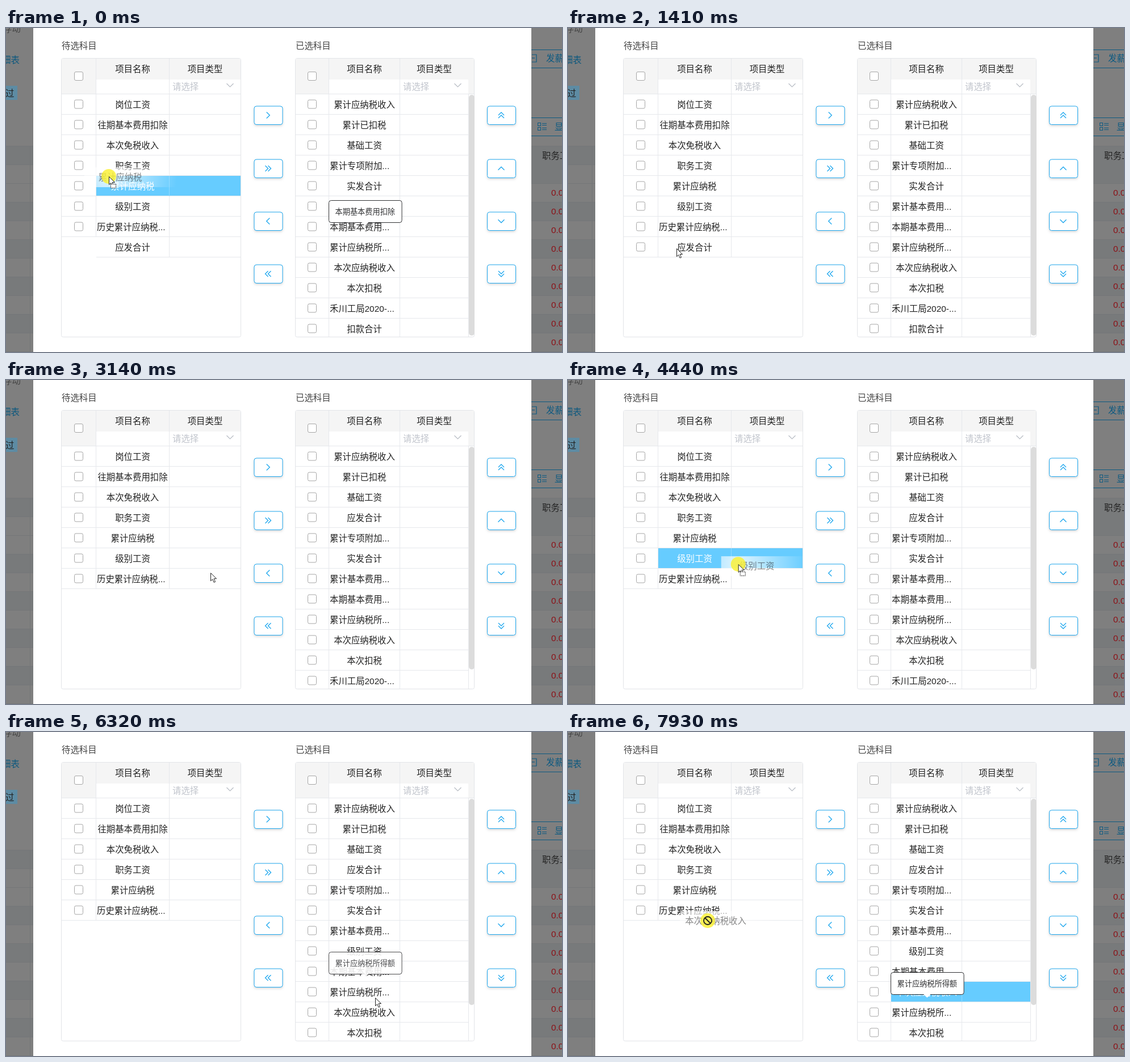
Write an HTML page with a canvas that moves like this. It is 979 px wide and 572 px high and loops after 8 s.

```html
<!DOCTYPE html>
<html lang="zh-CN">
<head>
<meta charset="utf-8">
<title>科目选择</title>
<style>
html, body { margin: 0; width: 100%; height: 100%; overflow: hidden; background: #7f7f7f; }
canvas { display: block; }
</style>
</head>
<body>
<canvas id="stage" width="979" height="572"></canvas>
<script>
const c = document.getElementById('stage').getContext('2d');
const LOOP = 8000, TOP = 117, ROW = 36, SHIFT = 120;
const BLUE = '#1ea7ee', PICK = '#66ccff', LINE = '#e6e8ec';

const names = {
  a: '岗位工资', b: '往期基本费用扣除', c: '本次免税收入', d: '职务工资',
  e: '累计应纳税', f: '级别工资', g: '历史累计应纳税...', h: '应发合计',
  A: '累计应纳税收入', B: '累计已扣税', C: '基础工资', D: '累计专项附加...',
  E: '实发合计', F: '累计基本费用...', G: '本期基本费用...', H: '累计应纳税所...',
  I: '本次应纳税收入', J: '本次扣税', K: '禾川工局2020-...', L: '扣款合计'
};

// Row order of both tables from a given time, with the scroll thumb's end
const orders = [
  [-999, 'abcdefgh', 'ABCDEFGHIJKL', 543],
  [1960, 'abcdefg', 'ABCDhEFGHIJKL', 511],
  [2040, 'abcdefg', 'ABChDEFGHIJKL', 511],
  [4700, 'abcdeg', 'ABChDEFfGHIJKL', 482],
  [7367, 'abcdeg', 'ABChDEFfGIHJKL', 482]
];

// row, start, release, end of highlight, ghost offset x, y
const drags = [
  ['e', -1, 70, 500, 20, 1],
  ['h', 1600, 2640, 3090, 49, 0],
  ['f', 4290, 4960, 5440, 33, 3],
  ['I', 7330, 8001, 8001, 14, 0]
];

// text, x, y, shown from, shown until
const tips = [
  ['本期基本费用扣除', 568, 304, -999, 500],
  ['历史累计应纳税收入', 153, 244, 4780, 5520],
  ['累计应纳税所得额', 568, 388, 6190, 6800],
  ['累计应纳税所得额', 568, 424, 7600, 9000]
];

// time, x, y of the pointer
const path = [
  [0, 181, 262], [70, 181, 262], [790, 188, 320], [880, 188, 320], [1410, 191, 389],
  [1570, 191, 389], [1720, 245, 370], [2110, 632, 234], [2270, 633, 233], [2640, 633, 233],
  [3420, 208, 400], [3500, 208, 400], [3810, 210, 314], [3950, 210, 314], [3960, 214, 316],
  [4230, 214, 316], [4440, 299, 325], [4960, 664, 402], [5370, 664, 402], [6150, 650, 469],
  [6620, 650, 469], [6850, 642, 499], [7250, 642, 499], [7330, 480, 447], [7380, 352, 405],
  [7930, 246, 333], [8000, 246, 333]
];

const within = (t, a, b) => t >= a && t < b;
const clamp = v => Math.max(0, Math.min(1, v));
const mix = (a, b, k) => a + (b - a) * k;

function pointer(t) {
  const i = path.findIndex(p => p[0] > t), p = path[i - 1], q = path[i];
  const k = (t - p[0]) / (q[0] - p[0]);
  return [mix(p[1], q[1], k), mix(p[2], q[2], k)];
}

function box(x, y, w, h, color) {
  c.fillStyle = color;
  c.fillRect(x, y, w, h);
}

function round(x, y, w, h, r, fill, stroke) {
  c.beginPath();
  c.roundRect(x, y, w, h, r);
  if (fill) { c.fillStyle = fill; c.fill(); }
  if (stroke) { c.strokeStyle = stroke; c.lineWidth = 1; c.stroke(); }
}

function poly(points, stroke, width = 1.2, fill, close) {
  c.beginPath();
  points.forEach(([x, y]) => c.lineTo(x, y));
  if (close) c.closePath();
  if (fill) { c.fillStyle = fill; c.fill(); }
  if (stroke) { c.strokeStyle = stroke; c.lineWidth = width; c.stroke(); }
}

// y is the middle of the glyphs
function text(s, x, y, color = '#222', align = 'left', size = 15.4) {
  c.font = size + 'px "Liberation Sans", "Noto Sans CJK SC", "Noto Sans CJK", sans-serif';
  c.textAlign = align;
  c.fillStyle = color;
  c.fillText(s, x, y + size * .38);
}

function check(x, y) { round(x - 7.5, y - 7.5, 15, 15, 2.5, '#fff', '#a6a6a6'); }

function backdrop() {
  box(0, 0, 979, 572, '#7f7f7f');
  box(0, 208, 979, 33, '#787a7b');
  box(925, 241, 54, 33, '#787a7b');
  for (let y = 274, i = 0; y < 572; y += 33, i++) {
    if (i % 2) box(0, y, 979, 33, '#787a7b');
    box(0, y, 979, 1, '#747678');
    text('0.0', 960, y + 16, '#8c1218');
  }
  box(0, 208, 979, 1, '#747678');
  box(0, 241, 48, 1, '#747678');
  box(42, 208, 1, 364, '#747678');
  text('浮动', -5, 1, '#444');
  text('细表', -7, 56, '#0c587e');
  box(0, 102, 20, 25, '#5d8ba3');
  text('过', -1, 115, '#222');
  const blue = '#0c5a82';
  [38, 70, 158, 190].forEach(y => box(925, y, 54, 1, blue));
  poly([[926, 47], [934, 47], [934, 60], [926, 60]], blue);
  poly([[926, 53], [931, 53]], blue);
  text('发薪', 951, 53, blue);
  for (const y of [167, 175]) {
    c.strokeStyle = blue;
    c.lineWidth = 1;
    c.strokeRect(936.5, y + .5, 5, 5);
    box(944, y + 1, 8, 1, blue);
    box(944, y + 4, 8, 1, blue);
  }
  text('显', 966, 174, blue);
  text('职务工', 944, 225, '#222');
}

const rightList = { x: 509, end: 825, name: 569, type: 693, close: 814 };
const leftList = { x: 97, end: 414, name: 159, type: 287, close: 413 };

function head(p, title) {
  text(title, p.x + 1, 31, '#444');
  round(p.x + .5, 53.5, p.end - p.x - 1, 492, 3, '#fff', '#e2e4e8');
  box(p.x + 1, 54, p.end - p.x - 2, 37, '#f5f5f5');
  box(p.x + 1, 91, p.name - p.x - 2, 26, '#f5f5f5');
  if (p.close < p.end - 5) box(p.close, 91, p.end - p.close - 1, 26, '#f5f5f5');
  box(p.x + 1, 117 - 1, p.end - p.x - 2, 1, LINE);
  [p.name - 1, p.type].forEach(x => box(x, 54, 1, 63, LINE));
  check(p.x + (p === leftList ? 31 : 30), 85);
  text('项目名称', (p.name + p.type) / 2, 72, '#222', 'center');
  text('项目类型', (p.type + p.close) / 2 + .5, 72, '#222', 'center');
  text('请选择', p.type + 6, 103, '#c0c4cc');
  const x = p.close - 18.5;
  poly([[x - 6, 98], [x, 104], [x + 6, 98]], '#b8bcc4');
}

function row(p, y, key, picked) {
  const w = p.close - p.name;
  box(p.name, y, w, 35, picked ? PICK : '#fff');
  box(p.name, y + 35, w, 1, LINE);
  box(p.type, y, 1, 36, picked ? '#8fd9ff' : LINE);
  const s = names[key], color = picked ? '#fff' : '#222';
  if (s.endsWith('...')) text(s, p.name + 1, y + 18, color);
  else text(s, (p.name + p.type) / 2, y + 18, color, 'center');
}

function list(p, side, t, boxes, picked) {
  const i = orders.findLastIndex(o => o[0] <= t);
  const now = orders[i][side], old = orders[Math.max(0, i - 1)][side];
  const k = clamp((t - orders[i][0]) / SHIFT);
  const place = key => {
    const a = old.indexOf(key), b = now.indexOf(key);
    return TOP + ROW * (a < 0 ? b : mix(a, b, k));
  };
  c.save();
  c.beginPath();
  c.rect(p.x, TOP, p.end - p.x, 428);
  c.clip();
  for (let n = 0; n < boxes; n++) {
    check(p.x + (p === leftList ? 31 : 30), TOP + 17.5 + ROW * n);
    box(p.x + 1, TOP + 35 + ROW * n, p.name - p.x - 1, 1, LINE);
  }
  box(p.name - 1, TOP, 1, ROW * boxes, LINE);
  if (now.includes(picked)) {
    // the newly entered row waits below its neighbour until that has moved
    if (picked === 'h' && i === 2 && k < 1) {
      box(p.name + 1, TOP + 4 * ROW, 131, 35, PICK);
      box(p.name + 11, TOP + 4 * ROW, 1, 35, '#8fd9ff');
    } else row(p, place(picked), picked, true);
  }
  for (const key of now) if (key !== picked) row(p, place(key), key);
  if (side === 2) {
    box(p.close, TOP, 1, 428, LINE);
    round(815, 118, 10, orders[i][3] - 118, 5, '#dcdcdc');
  }
  c.restore();
}

function button(x, y, dir, twice) {
  c.save();
  c.shadowColor = 'rgba(0,0,0,.18)';
  c.shadowBlur = 4;
  c.shadowOffsetY = 2;
  round(x + .5, y - 16, 50, 32.5, 4, '#fff');
  c.restore();
  round(x + .5, y - 16, 50, 32.5, 4, null, BLUE);
  c.save();
  c.translate(x + 25, y);
  c.rotate(dir * Math.PI / 2);
  for (const o of twice ? [-2.5, 2.5] : [0]) {
    const h = twice ? 5 : 5.5, d = twice ? 2.5 : 2.8;
    poly([[o - d, -h], [o + d, 0], [o - d, h]], BLUE, 1.3);
  }
  c.restore();
}

function tip([s, x, y, from, to], t) {
  const alpha = Math.min(clamp((t - from) / 150), clamp((to - t) / 150));
  if (!alpha) return;
  const w = s.length * 13.2 + 23;
  c.save();
  c.globalAlpha = alpha;
  round(x + .5, y + .5, w, 39, 4, '#fff', '#303133');
  poly([[x + w / 2 - 6, y + 39], [x + w / 2, y + 45], [x + w / 2 + 6, y + 39]], null, 0, '#fff');
  text(s, x + w / 2, y + 20, '#303133', 'center', 13.2);
  c.restore();
}

function ghost([key, , , , dx, dy], x, y) {
  const mid = x + dx, cy = y + dy;
  const glow = c.createRadialGradient(x, y, 0, x, y, 120);
  glow.addColorStop(0, 'rgba(255,255,255,.8)');
  glow.addColorStop(1, 'rgba(255,255,255,0)');
  box(mid - 63, cy - 17, 254, 35, glow);
  text(names[key], mid, cy, 'rgba(34,34,34,.55)', 'center');
}

function cursor(t, x, y, dragging) {
  if (dragging || within(t, 4230, 4290) || within(t, 7150, 7330)) {
    c.beginPath();
    c.arc(x, y, 13, 0, 7);
    c.fillStyle = 'rgba(250,240,50,.82)';
    c.fill();
  }
  if (t >= 7330) {
    c.beginPath();
    c.arc(x, y, 7, 0, 7);
    c.moveTo(x - 5, y - 5);
    c.lineTo(x + 5, y + 5);
    c.strokeStyle = '#222';
    c.lineWidth = 1.8;
    c.stroke();
  } else if (within(t, 3960, 4290) || within(t, 4960, 5450) || t >= 6780) {
    box(x - .5, y - 7, 1, 15, '#222');
    for (const dy of [-8, 7]) {
      box(x - 4, y + dy, 3, 1, '#222');
      box(x + 1, y + dy, 3, 1, '#222');
    }
  } else {
    const arrow = [[0, 0], [0, 14], [3.2, 11], [5.6, 16.5], [8, 15.5], [5.6, 10], [10, 10]];
    poly(arrow.map(([a, b]) => [x + a + .5, y + b + .5]), '#222', 1, '#fff', true);
    if (dragging) {
      c.save();
      c.setLineDash([2, 1]);
      round(x + 3.5, y + 13.5, 9, 7, 0, '#fff', '#222');
      c.restore();
    }
  }
}

function draw(t) {
  backdrop();
  box(48, 0, 877, 572, '#fff');
  const drag = drags.find(d => within(t, d[1], d[3]));
  const picked = drag && drag[0];
  const boxes = t < 500 ? 7 : t < 3090 ? 8 : t < 5440 ? 7 : 6;
  head(leftList, '待选科目');
  head(rightList, '已选科目');
  list(leftList, 1, t, boxes, picked);
  list(rightList, 2, t, 12, picked);
  [154, 248, 341, 434].forEach((y, i) => {
    button(436.5, y, i < 2 ? 0 : 2, i % 2);
    button(847, y, i < 2 ? 3 : 1, i === 0 || i === 3);
  });
  tips.forEach(s => tip(s, t));
  const [x, y] = pointer(t), dragging = drag && t < drag[2];
  if (dragging) ghost(drag, x, y);
  cursor(t, x, y, dragging);
}

function frame(now) {
  draw(now % LOOP);
  requestAnimationFrame(frame);
}
draw(0);
requestAnimationFrame(frame);
</script>
</body>
</html>
```
